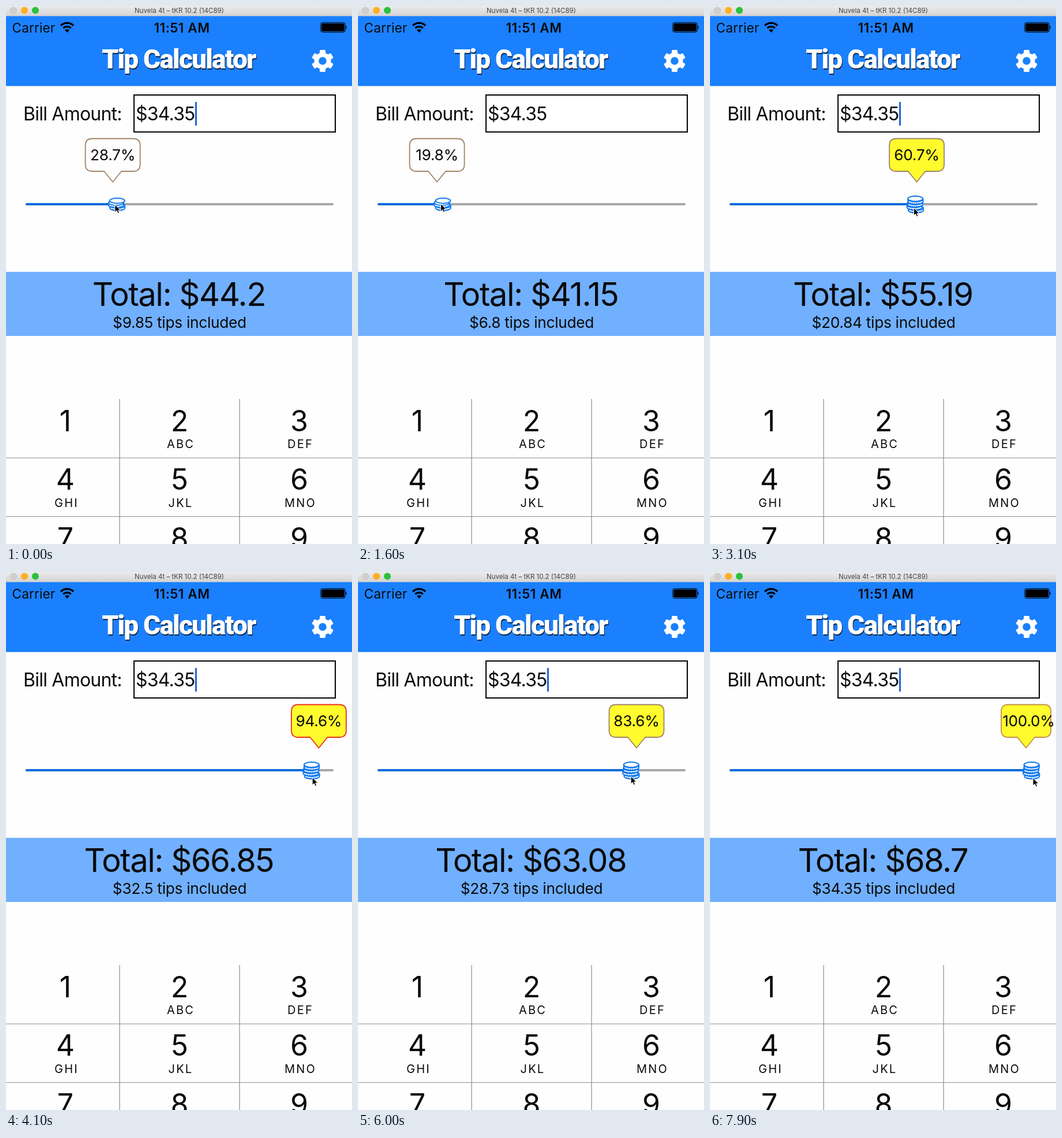
These frames come from a looping animation (600x931 px, 8000 ms). An HTML page:

```html
<!DOCTYPE html>
<html lang="en">
<head>
<meta charset="utf-8">
<title>Tip Calculator</title>
<style>
  html, body { margin: 0; width: 100%; height: 100%; overflow: hidden; background: #fefefe; }
  svg { display: block; width: 600px; height: 931px; }
  text { font-family: Inter, Roboto, sans-serif; fill: #0a0a0a; white-space: pre; }
  .mid { text-anchor: middle; }
  .body { font-size: 32px; letter-spacing: -.77px; }
  .small { font-size: 26.25px; letter-spacing: -.28px; }
  .status { font-size: 22.5px; letter-spacing: .2px; }
  .total { font-size: 56.25px; letter-spacing: -1.55px; }
  .window { font-size: 11.5px; fill: #444; }
  .heading { font: 900 46px Roboto, "Open Sans", sans-serif; letter-spacing: -1.8px; }
  .digit { font-size: 50px; }
  .letters { font-size: 20px; letter-spacing: 2.2px; }
  .coin { fill: #fff; stroke: #0f78ee; stroke-width: 2; }
</style>
</head>
<body>
<svg viewBox="0 0 600 931">
  <defs>
    <linearGradient id="chrome" x2="0" y2="1">
      <stop stop-color="#ebebeb"/><stop offset="1" stop-color="#d3d3d3"/>
    </linearGradient>
  </defs>
  <rect width="600" height="931" fill="#fefefe"/>

  <rect y="17" width="600" height="121.5" fill="#1b80fe"/>
  <rect width="600" height="17.5" fill="url(#chrome)"/>
  <circle cx="13" cy="7.5" r="5.5" fill="#cfcfcf" stroke="#bdbdbd" stroke-width=".7"/>
  <circle cx="32" cy="7.5" r="6" fill="#fbaf24"/>
  <circle cx="51" cy="7.5" r="6" fill="#2bc13a"/>
  <text class="window mid" x="300.5" y="12">Nuvela 4t – tKR 10.2 (14C89)</text>

  <text class="status" x="10.5" y="46">Carrier</text>
  <g fill="none" stroke="#000" stroke-width="3.2">
    <path d="M95 34a15.6 15.6 0 0 1 22 0M99.4 38.4a9.3 9.3 0 0 1 13.2 0"/>
    <path d="M106 46l-4-4.2a5.6 5.6 0 0 1 8 0z" fill="#000" stroke="none"/>
  </g>
  <text class="status mid" x="305" y="46" font-weight="600" style="letter-spacing:.6px">11:51 AM</text>
  <rect x="545.5" y="28.5" width="43" height="17" rx="4" fill="none" stroke="#000"/>
  <rect x="547" y="30" width="40" height="14" rx="2.5"/>
  <path d="M589.5 34q2.5 3 0 6z"/>

  <text class="heading mid" x="300.5" y="110" style="fill:#0b2448">Tip Calculator</text>
  <text class="heading mid" x="299.5" y="108" style="fill:#fff">Tip Calculator</text>
  <g id="gear" transform="translate(549 95)" fill="#fff"></g>

  <text class="body" x="30" y="198">Bill Amount:</text>
  <rect x="222" y="154" width="349" height="64" fill="#fff" stroke="#000" stroke-width="2"/>
  <text class="body" x="225" y="198">$34.35</text>
  <rect id="caret" x="327.8" y="166" width="3.2" height="41" rx="1" fill="#2a68d8"/>

  <path d="M36 343H566" stroke="#a7a8ab" stroke-width="4" stroke-linecap="round"/>
  <path id="filled" stroke="#0b6bdc" stroke-width="4" stroke-linecap="round"/>
  <g id="few" class="coin"></g>
  <g id="many" class="coin"></g>

  <path id="bubble" stroke-width="1.8" stroke-linejoin="round"/>
  <text id="percent" class="small mid" y="267"></text>
  <path id="cursor" d="M0 0V13.2L3.1 10.4L5.2 15L7.5 14L5.5 9.6H9.6Z" stroke="#fff"/>

  <rect y="460" width="600" height="111" fill="#71b0ff"/>
  <text id="total" class="total mid" x="299.8" y="519"></text>
  <text id="tips" class="small mid" x="301" y="557"></text>

  <path d="M197 680V931M405 680V931M0 782H600M0 883.5H600" stroke="#8c8c8f" stroke-width="1.2"/>
  <g id="keypad"></g>
</svg>
<script>
(() => {
  const LOOP = 8000, STEP = 100, BILL = 34.35;
  const byId = id => document.getElementById(id);
  const setAttrs = (id, attrs) => {
    for (const name in attrs) byId(id).setAttribute(name, attrs[name]);
  };

  // Turning points of the drag: [time in ms, tip in percent].
  const drag = [
    [0, 28.68], [800, 22.24], [1400, 19.6], [1900, 20.1], [2300, 27.752], [2700, 94.8],
    [3100, 60.67], [3700, 23], [4100, 94.6], [4500, 63.4], [5400, 63.4],
    [6300, 93.752], [6600, 93.752], [7100, 100], [LOOP, 100]
  ];

  function dragAt(t) {
    const i = drag.findIndex(([time]) => time > t);
    const [t0, from] = drag[i - 1], [t1, to] = drag[i];
    return {
      tip: from + (to - from) * (t - t0) / (t1 - t0),
      held: from === to ? t - t0 : 0
    };
  }

  const coinFace = (x, y) => `<ellipse cx="${x}" cy="${y}" rx="13" ry="4.4"/>`;

  const coin = (x, y) =>
    `<path d="M${x - 13} ${y}v4a13 4.5 0 0 0 26 0v-4"/>` + coinFace(x, y) +
    `<path d="M${x - 9} ${y + 6.5}a14 4 0 0 0 18 0" fill="none" stroke-dasharray="1.5 2"/>`;

  // Coins piled upwards, each nudged sideways a little.
  function pile(count, bottom) {
    let out = '';
    for (let i = 0; i < count; i++) out += coin(1.3 * Math.cos(2.4 * i), bottom - 5 * i);
    return out;
  }

  function buildStatic() {
    byId('few').innerHTML = pile(2, 345.5) + coinFace(1, 337);
    byId('many').innerHTML = pile(4, 349.5) + coinFace(0.5, 333.5);

    const teeth = [0, 60, 120].map(a =>
      `<rect x="-5" y="-19" width="10" height="38" rx="1.5" transform="rotate(${a})"/>`);
    byId('gear').innerHTML = `<circle r="14.5"/>${teeth.join('')}<circle r="6.8" fill="#1b80fe"/>`;

    const words = ['', 'ABC', 'DEF', 'GHI', 'JKL', 'MNO', '', '', ''];
    const columns = [103, 301, 508.5];
    byId('keypad').innerHTML = words.map((word, i) => {
      const x = columns[i % 3], y = 735.5 + 101.5 * Math.floor(i / 3);
      return `<text class="digit mid" x="${x}" y="${y}">${i + 1}</text>` +
        `<text class="letters mid" x="${x + 2}" y="${y + 29.5}">${word}</text>`;
    }).join('');
  }

  function bubblePath(left, width) {
    const right = left + width, mid = left + width / 2, r = 12;
    return `M${left + r} 229.5H${right - r}q${r} 0 ${r} ${r}V274q0 ${r} ${-r} ${r}` +
      `H${mid + 15}L${mid} 304.5L${mid - 15} 286H${left + r}q${-r} 0 ${-r} ${-r}` +
      `V241.5q0 ${-r} ${r} ${-r}Z`;
  }

  function draw(t) {
    const { tip, held } = dragAt(t);
    const amount = +(BILL * tip / 100).toFixed(2);
    const thumb = 45 + 5.12 * tip;
    const center = Math.min(29.7 + 5.42 * tip, 552.5);
    const rich = tip >= 50;

    setAttrs('filled', { d: `M36 343H${thumb}` });
    setAttrs('few', { transform: `translate(${thumb})`, visibility: rich ? 'hidden' : 'visible' });
    setAttrs('many', { transform: `translate(${thumb})`, visibility: rich ? 'visible' : 'hidden' });

    // The bubble narrows while the thumb rests.
    setAttrs('bubble', {
      d: bubblePath(center - 47.5, 95 - held / 90),
      fill: rich ? '#fffb2d' : '#fefefe',
      stroke: tip > 90 && tip < 100 ? '#eb321e' : held ? '#c49048' : '#a08468'
    });
    setAttrs('percent', { x: center });
    byId('percent').textContent = tip.toFixed(1) + '%';

    const lead = 6 * (tip / 100) ** 4 - 3;
    setAttrs('cursor', { transform: `translate(${thumb + lead} ${338.5 + 0.18 * tip})` });

    const blink = 0.64 + 1.15 * Math.cos(2 * Math.PI * (t / 1000 + 0.02));
    setAttrs('caret', { opacity: Math.min(1, Math.max(0, blink)) });

    byId('total').textContent = 'Total: $' + +(BILL + amount).toFixed(2);
    byId('tips').textContent = `$${amount} tips included`;
  }

  buildStatic();
  const start = performance.now();
  function tick() {
    const t = Math.max(0, performance.now() - start) % LOOP;
    draw(Math.floor(t / STEP) * STEP);
    requestAnimationFrame(tick);
  }
  tick();
})();
</script>
</body>
</html>
```
